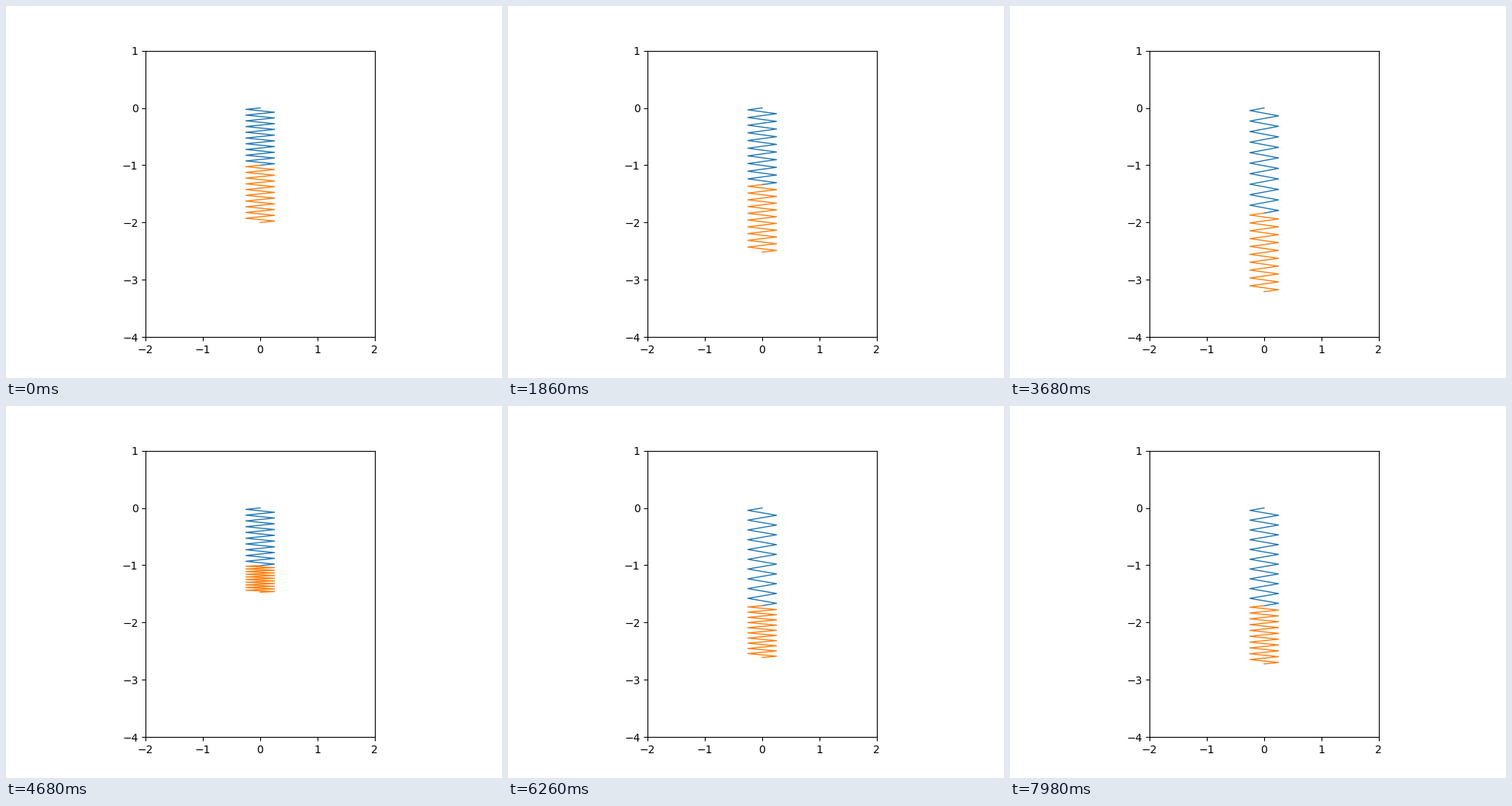
Animation of 640x480 px, one loop 8 s. Source, as a matplotlib script:

```python
import numpy as np
import matplotlib.pyplot as plt
from matplotlib.animation import FuncAnimation

FRAMES = 400
INTERVAL = 20
DT = 30 / 1499          # time step of a 1500-point grid over 30 s

G = 10.0                # gravity
K1, K2 = 7.0, 14.0      # stiffness per mass of upper and lower spring
START1, START2 = -1.0, -2.0

COILS = 20
HALF_WIDTH = 0.25


def positions(t):
    """Heights of both spring ends: two oscillators released from rest."""
    w1, w2 = np.sqrt(K1), np.sqrt(K2)
    mid1 = -G / K1
    mid2 = mid1 - G / K2
    amp1 = START1 - mid1
    forced = amp1 * K2 / (K2 - K1)
    free = START2 - mid2 - forced
    y1 = mid1 + amp1 * np.cos(w1 * t)
    y2 = mid2 + forced * np.cos(w1 * t) + free * np.cos(w2 * t)
    return y1, y2


def spring(top, bottom):
    """Zigzag between two heights on the vertical axis."""
    i = np.arange(COILS)
    x = np.where(i % 2 == 0, -HALF_WIDTH, HALF_WIDTH)
    s = np.concatenate(([0], (i + 0.5) / COILS, [1]))
    return np.concatenate(([0], x, [0])), top + (bottom - top) * s


fig, ax = plt.subplots(figsize=(6.4, 4.8), dpi=100)
ax.set_aspect("equal")
ax.set_xlim(-2, 2)
ax.set_ylim(-4, 1)
upper, = ax.plot([], [], lw=1, color="tab:blue")
lower, = ax.plot([], [], lw=1, color="tab:orange")


def update(frame):
    y1, y2 = positions(frame * DT)
    upper.set_data(*spring(0, y1))
    lower.set_data(*spring(y1, y2))
    return upper, lower


anim = FuncAnimation(fig, update, frames=FRAMES, interval=INTERVAL,
                     repeat=True, repeat_delay=0)
plt.show()
```
